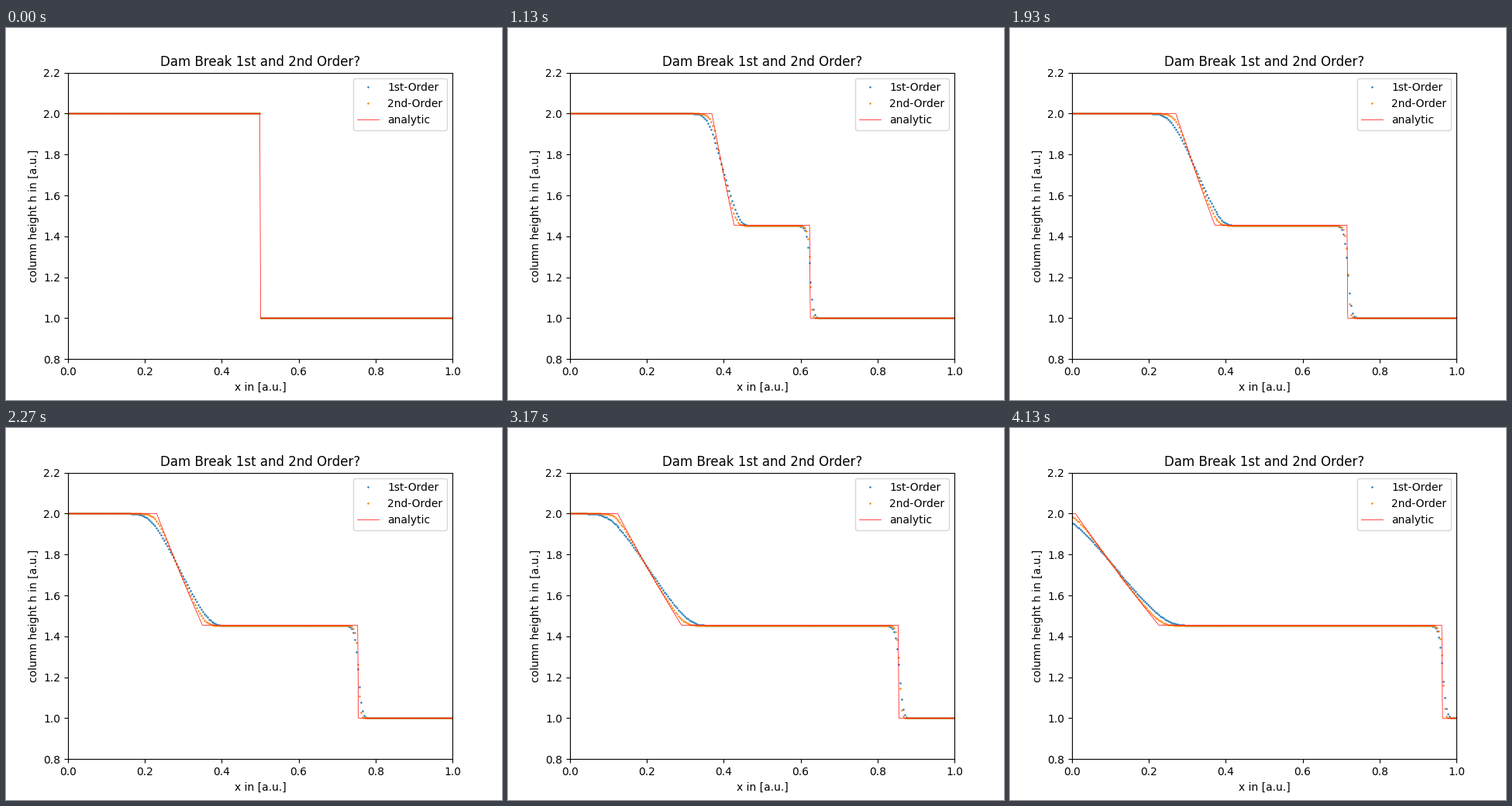
Animation of 640 by 480 pixels, one loop 4160 ms. Source, as a matplotlib script:

```python
import numpy as np
import matplotlib.pyplot as plt
from matplotlib.animation import FuncAnimation

FRAMES, LOOP_MS = 125, 4160
FRAME_DT, SUBSTEPS = 0.0028, 2
CELLS = 250
H_LEFT, H_RIGHT, X_DAM = 2.0, 1.0, 0.5
DX = 1 / CELLS
DT = FRAME_DT / SUBSTEPS

# Shallow water equations with g = 1, state rows: height, discharge


def flux(q):
    h, m = q
    return np.array([m, m * m / h + h * h / 2])


def hll(ql, qr):
    ul, ur = ql[1] / ql[0], qr[1] / qr[0]
    cl, cr = np.sqrt(ql[0]), np.sqrt(qr[0])
    sl = np.minimum(np.minimum(ul - cl, ur - cr), 0)
    sr = np.maximum(np.maximum(ul + cl, ur + cr), 0)
    return (sr * flux(ql) - sl * flux(qr) + sl * sr * (qr - ql)) / (sr - sl)


def minmod(a, b):
    return np.where(a * b > 0, np.sign(a) * np.minimum(abs(a), abs(b)), 0)


def rate(q, order):
    p = np.pad(q, ((0, 0), (2, 2)), mode="edge")
    slope = np.zeros_like(p)
    if order == 2:
        d = np.diff(p, axis=1)
        slope[:, 1:-1] = minmod(d[:, :-1], d[:, 1:])
    f = hll((p + slope / 2)[:, 1:-2], (p - slope / 2)[:, 2:-1])
    return -np.diff(f, axis=1) / DX


def step(q, order):
    q1 = q + DT * rate(q, order)
    if order == 1:
        return q1
    return (q + q1 + DT * rate(q1, order)) / 2


def simulate(order):
    q = np.array([np.where(x < X_DAM, H_LEFT, H_RIGHT), np.zeros(CELLS)])
    heights = [q[0]]
    for _ in range(FRAMES - 1):
        for _ in range(SUBSTEPS):
            q = step(q, order)
        heights.append(q[0])
    return heights


def middle_height():
    lo, hi = H_RIGHT, H_LEFT
    for _ in range(60):
        h = (lo + hi) / 2
        fan = 2 * (np.sqrt(H_LEFT) - np.sqrt(h))
        shock = (h - H_RIGHT) * np.sqrt((1 / h + 1 / H_RIGHT) / 2)
        lo, hi = (h, hi) if fan > shock else (lo, h)
    return lo


def analytic(t):
    s = xa - X_DAM
    if t == 0:
        return np.where(s <= 0, H_LEFT, H_RIGHT)
    fan = np.clip((2 * np.sqrt(H_LEFT) - s / t) ** 2 / 9, h_mid, H_LEFT)
    return np.where(s <= shock_speed * t, fan, H_RIGHT)


x = (np.arange(CELLS) + 0.5) * DX
xa = np.linspace(0, 1, 500)
h_mid = middle_height()
shock_speed = np.sqrt(h_mid * (h_mid + H_RIGHT) / (2 * H_RIGHT))
first, second = simulate(1), simulate(2)

fig, ax = plt.subplots(figsize=(6.4, 4.8), dpi=100)
dots1, = ax.plot(x, first[0], "o", ms=0.8, label="1st-Order")
dots2, = ax.plot(x, second[0], "o", ms=0.8, label="2nd-Order")
line, = ax.plot(xa, analytic(0), "r", lw=0.5, label="analytic")
ax.set(xlim=(0, 1), ylim=(0.8, 2.2), xlabel="x in [a.u.]",
       ylabel="column height h in [a.u.]",
       title="Dam Break 1st and 2nd Order?")
ax.legend(loc="upper right")


def update(k):
    dots1.set_ydata(first[k])
    dots2.set_ydata(second[k])
    line.set_ydata(analytic(k * FRAME_DT))
    return dots1, dots2, line


anim = FuncAnimation(fig, update, frames=FRAMES, interval=LOOP_MS / FRAMES,
                     repeat=True, repeat_delay=0)
plt.show()
```
